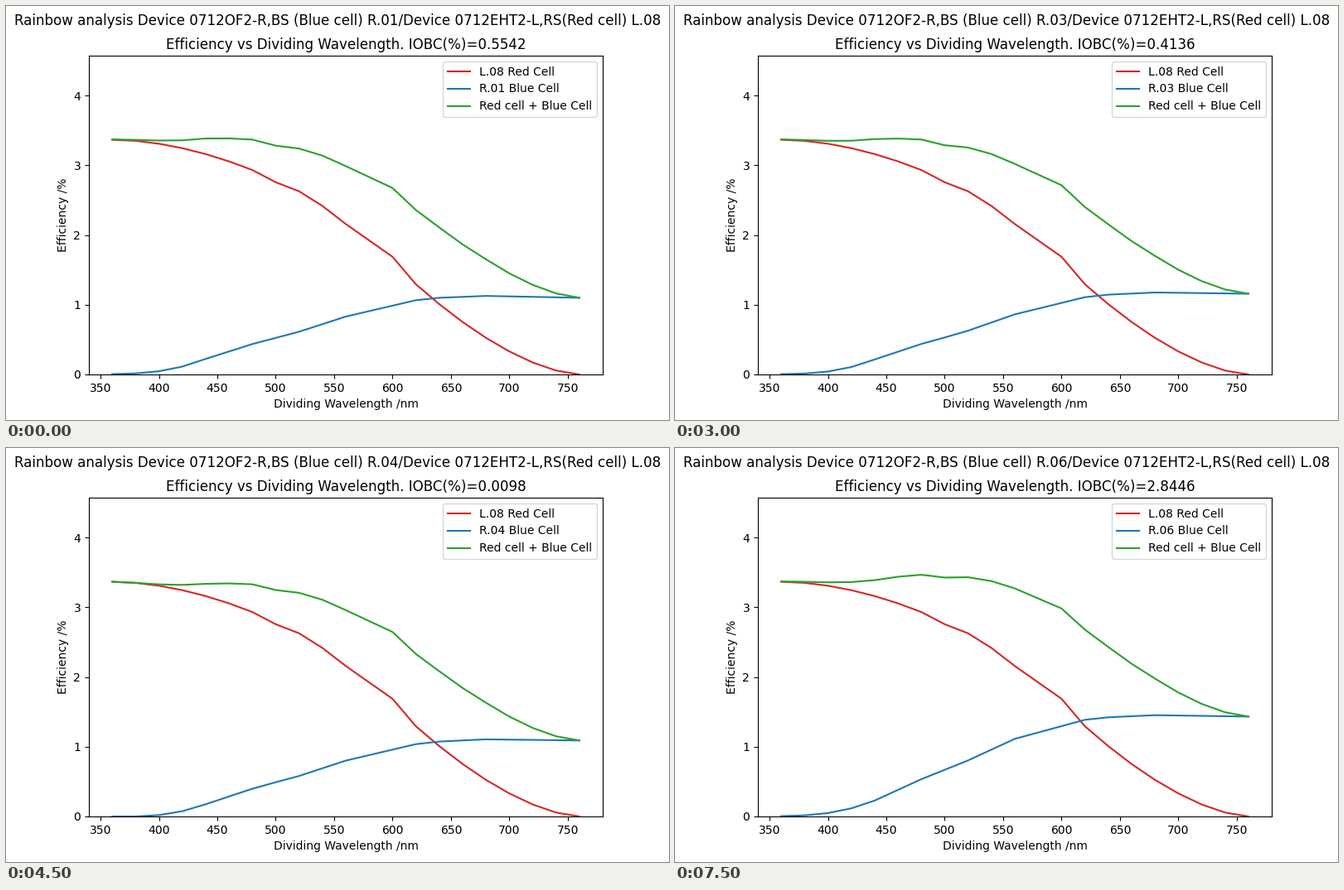
A matplotlib script that plays this animation: 800 by 500 pixels, repeating every 8000 ms.

```python
import matplotlib.pyplot as plt
import numpy as np
from matplotlib.animation import FuncAnimation

STEP_MS = 500
STEPS_PER_CELL = 3
STEPS = 16

# Fine horizontal hinting keeps letter spacing close to the nominal font size
plt.rcParams["text.hinting_factor"] = 18

wavelength = np.arange(360, 761, 20)


def through(points):
    """Straight segments through (wavelength, value) key points."""
    return np.interp(wavelength, *zip(*points))


# Red cell: power-law shoulder, measured slope, power-law tail
shoulder = 3.366 - 0.434 * ((wavelength - 360) / 120) ** 1.85
slope = through([(480, 2.932), (500, 2.757), (520, 2.627), (540, 2.417),
                 (560, 2.158), (600, 1.688), (620, 1.294)])
tail = 1.294 * ((760 - wavelength) / 140) ** 1.61
red = np.where(wavelength < 480, shoulder,
               np.where(wavelength <= 620, slope, tail))

# Blue cells: one common curve, bent by each device's deviation at SHIFT_AT
blue_base = through([(360, 0.005), (380, 0.015), (400, 0.047), (420, 0.114),
                     (480, 0.447), (520, 0.632), (560, 0.857), (620, 1.1),
                     (640, 1.138), (680, 1.172), (760, 1.16)])
SHIFT_AT = [360, 440, 500, 560, 620, 760]
devices = [  # IOBC, deviation
    (0.5542, [0, -0.002, -0.015, -0.027, -0.035, -0.06]),
    (0.7039, [0, 0, 0, 0, 0, 0]),
    (0.4136, [0, -0.01, -0.009, 0.005, 0.008, -0.002]),
    (0.0098, [-0.005, -0.05, -0.049, -0.056, -0.063, -0.07]),
    (0.0196, [-0.005, -0.042, 0.006, 0.045, 0.084, 0.165]),
    (2.8446, [0, 0.003, 0.13, 0.256, 0.286, 0.273]),
]


def blue_curve(shift):
    return np.maximum(blue_base + through(zip(SHIFT_AT, shift)), 0)


fig, ax = plt.subplots(figsize=(8, 5), dpi=100)
heading = fig.suptitle("", y=0.982)
title = ax.set_title("")
ax.set(xlim=(340, 780), ylim=(0, 4.572), yticks=range(5),
       xlabel="Dividing Wavelength /nm", ylabel="Efficiency /%")

ax.plot(wavelength, red, color="tab:red", label="L.08 Red Cell")
blue_line, = ax.plot(wavelength, blue_base, color="tab:blue",
                     label="R.01 Blue Cell")
sum_line, = ax.plot(wavelength, red + blue_base, color="tab:green",
                    label="Red cell + Blue Cell")
legend = ax.legend(loc="upper right")
blue_label = legend.get_texts()[1]


def update(step):
    i = step // STEPS_PER_CELL
    iobc, shift = devices[i]
    blue = blue_curve(shift)
    cell = f"R.{i + 1:02d}"
    heading.set_text(f"Rainbow analysis Device 0712OF2-R,BS (Blue cell) {cell}"
                     "/Device 0712EHT2-L,RS(Red cell) L.08")
    title.set_text(f"Efficiency vs Dividing Wavelength. IOBC(%)={iobc:.4f}")
    blue_label.set_text(f"{cell} Blue Cell")
    blue_line.set_ydata(blue)
    sum_line.set_ydata(red + blue)
    return heading, title, blue_label, blue_line, sum_line


anim = FuncAnimation(fig, update, frames=STEPS, interval=STEP_MS,
                     init_func=lambda: update(0), repeat=True, repeat_delay=0)
plt.show()
```
